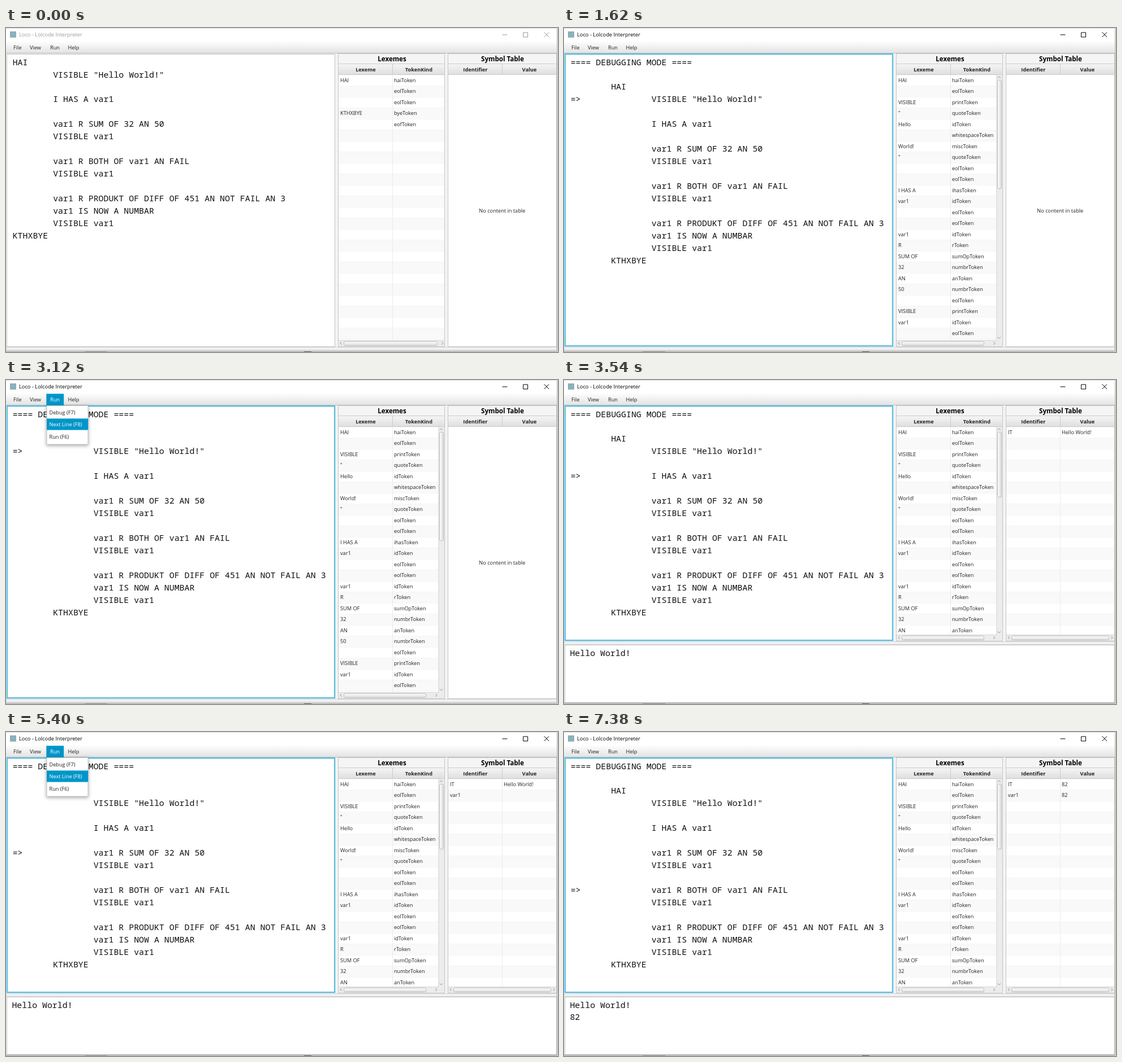
Animation, 976 px wide and 574 px high, one loop 8 s. Source, as an HTML page:

```html
<!DOCTYPE html>
<html lang="en">
<head>
<meta charset="utf-8">
<title>Loco - Lolcode Interpreter</title>
<style>
  html, body { margin: 0; width: 100%; height: 100%; overflow: hidden; background: #fff; }
  svg { display: block; width: 976px; height: 574px; }
  text { white-space: pre; font: 9.2px "Open Sans", "Noto Sans", sans-serif; fill: #222; }
  .code { font: 14.9px "Noto Sans Mono", "DejaVu Sans Mono", monospace; fill: #111; }
  .head { font-weight: 700; text-anchor: middle; }
  .panel { font-weight: 700; font-size: 11.6px; text-anchor: middle; fill: #000; }
  .title { font-size: 9.3px; }
  .mid { text-anchor: middle; }
  .inv { fill: #fff; }
  .shadow { filter: drop-shadow(0 2.5px 3px rgba(0, 0, 0, .35)); }
</style>
</head>
<body>
<svg id="stage" viewBox="0 0 976 574" xmlns="http://www.w3.org/2000/svg">
  <defs>
    <linearGradient id="bar" x2="0" y2="1"><stop stop-color="#fdfdfd"/><stop offset="1" stop-color="#e2e2e2"/></linearGradient>
    <linearGradient id="col" x2="0" y2="1"><stop stop-color="#f6f6f6"/><stop offset="1" stop-color="#dedede"/></linearGradient>
    <linearGradient id="thumbH" x2="0" y2="1"><stop stop-color="#fff"/><stop offset="1" stop-color="#dcdcdc"/></linearGradient>
    <linearGradient id="thumbV"><stop stop-color="#fff"/><stop offset="1" stop-color="#dcdcdc"/></linearGradient>
  </defs>
  <g id="view"></g>
</svg>
<script>
const LOOP = 8000, ROW = 19.5, LINE = 21.94, TAB = 71.5, BLUE = '#0096c9';

// Each step patches the state from that moment on.
const steps = [
  [0, {active: 0, run: 0, menu: 0, hot: -1, caret: 0, debug: 0, arrow: 3, split: 0, symbols: [], out: []}],
  [420, {run: 1}],
  [840, {active: 1, menu: 1, caret: 1}],
  [1080, {hot: 0}],
  [1320, {caret: 0}],
  [1620, {run: 0, menu: 0, hot: -1, debug: 1}],
  [2580, {run: 1}],
  [2880, {menu: 1}],
  [3060, {hot: 0}],
  [3120, {hot: 1}],
  [3540, {run: 0, menu: 0, hot: -1, arrow: 5, split: 1, symbols: [['IT', 'Hello World!']], out: ['Hello World!']}],
  [3720, {run: 1}],
  [4200, {menu: 1}],
  [4320, {hot: 1}],
  [4740, {menu: 0, hot: -1}],
  [4800, {run: 0, arrow: 7, symbols: [['IT', 'Hello World!'], ['var1', '']]}],
  [4920, {run: 1}],
  [5160, {menu: 1}],
  [5340, {hot: 0}],
  [5400, {hot: 1}],
  [6240, {run: 0, menu: 0, hot: -1, arrow: 8, symbols: [['IT', 'Hello World!'], ['var1', '82']]}],
  [7380, {arrow: 10, symbols: [['IT', '82'], ['var1', '82']], out: ['Hello World!', '82']}]
];

const program = `HAI
\tVISIBLE "Hello World!"

\tI HAS A var1

\tvar1 R SUM OF 32 AN 50
\tVISIBLE var1

\tvar1 R BOTH OF var1 AN FAIL
\tVISIBLE var1

\tvar1 R PRODUKT OF DIFF OF 451 AN NOT FAIL AN 3
\tvar1 IS NOW A NUMBAR
\tVISIBLE var1
KTHXBYE`.split('\n');
const listing = ['==== DEBUGGING MODE ====', '', ...program.map(l => '\t' + l)];

const pairs = s => s.split(',').map(p => p.split(':'));
const shortLexemes = pairs('HAI:hai,:eol,:eol,KTHXBYE:bye,:eof');
const lexemes = pairs('HAI:hai,:eol,VISIBLE:print,":quote,Hello:id,:whitespace,World!:misc,":quote,:eol,:eol,' +
  'I HAS A:ihas,var1:id,:eol,:eol,var1:id,R:r,SUM OF:sumOp,32:numbr,AN:an,50:numbr,:eol,VISIBLE:print,var1:id,:eol');

const esc = s => s.replace(/&/g, '&amp;').replace(/</g, '&lt;');
const rect = (x, y, w, h, fill, more = '') => `<rect x="${x}" y="${y}" width="${w}" height="${h}" fill="${fill}" ${more}/>`;
const box = (x, y, w, h, stroke, fill = 'none', more = '') =>
  rect(x + .5, y + .5, w - 1, h - 1, fill, `stroke="${stroke}" ${more}`);
const text = (x, y, s, cls = '', more = '') => s ? `<text x="${x}" y="${y}" class="${cls}" ${more}>${esc(s)}</text>` : '';
const path = (d, stroke, w = 1) => `<path d="${d}" fill="none" stroke="${stroke}" stroke-width="${w}"/>`;

function titleBar(s) {
  const ink = s.active ? '#000' : '#999';
  return rect(0, 0, 976, 24, '#fff') + rect(7, 6, 11, 11, '#8fb0ba') +
    text(23, 15.4, 'Loco - Lolcode Interpreter', 'title', `style="fill:${ink}"`) +
    path('M877.5 12h9M914.5 8h8v8h-8zM951.5 7.5l8.5 8.5M960 7.5l-8.5 8.5', ink);
}

function menuBar(s) {
  return rect(0, 24, 975, 21, 'url(#bar)') + rect(0, 44, 975, 1, '#bdbdbd') +
    (s.run ? rect(71.3, 24.4, 30.9, 20.8, BLUE) : '') +
    [[13, 'File'], [42, 'View'], [78, 'Run'], [109.5, 'Help']]
      .map(([x, label]) => text(x, 38, label, s.run && label === 'Run' ? 'inv' : '')).join('');
}

function popup(s) {
  const rows = [[48, 61.3, 'Debug (F7)'], [68.3, 81.6, 'Next Line (F8)'], [91, 104.3, 'Run (F6)']];
  return `<g class="shadow">${box(71.5, 45, 74, 69.5, '#c4c4c4', '#fff')}</g>` +
    rows.map(([y, base, label], i) => (s.hot === i ? rect(72, y, 73.2, 20.3, BLUE) : '') +
      text(76.5, base, label, s.hot === i ? 'inv' : '')).join('');
}

function editor(s, bottom) {
  const lines = s.debug ? listing : program;
  const ring = (color, w, alpha) => rect(1.9, 46.2, 579.2, bottom - 47, 'none',
    `stroke="${color}" stroke-width="${w}" stroke-opacity="${alpha}"`);
  const edge = s.active
    ? rect(1, 46, 581, bottom - 46, '#fff') + ring('#039ed3', 3.4, .15) + ring('#039ed3', 1.3, .9)
    : box(1, 46, 581, bottom - 45, '#c3c3c3', '#fff');
  const base = i => 65.6 + i * LINE;
  return edge +
    lines.map((l, i) => text(11.7 + TAB * (l.lastIndexOf('\t') + 1), base(i), l.trim(), 'code')).join('') +
    (s.debug ? text(11.7, base(s.arrow), '=>', 'code') : '') +
    (s.caret ? rect(190.4, 335, 1.3, 24, '#000') : '');
}

function scrollH(x, y, w, from, to) {
  const m = y + 5.5, r = x + w;
  return rect(x, y, w, 11, '#ececec') + rect(x, y, w, 1, '#d6d6d6') +
    box(from, y + 2, to - from, 8, '#bcbcbc', 'url(#thumbH)', 'rx="2"') +
    path(`M${x + 5.5} ${m - 2.5}l-2.5 2.5l2.5 2.5M${r - 5.5} ${m - 2.5}l2.5 2.5l-2.5 2.5`, '#8a8a8a');
}

function scrollV(x, y, h, to) {
  const m = x + 5, b = y + h;
  return rect(x, y, 11, h, '#ececec') + rect(x, y, 1, h, '#d6d6d6') +
    box(x + 1.5, y + 9, 8, to - y - 9, '#bcbcbc', 'url(#thumbV)', 'rx="2"') +
    path(`M${m - 2.5} ${y + 5.5}l2.5 -2.5l2.5 2.5M${m - 2.5} ${b - 5.5}l2.5 2.5l2.5 -2.5`, '#8a8a8a');
}

function table(x, split, right, bottom, title, heads, rows) {
  const end = right + 1, w = end - x;
  let out = rect(x, 46, w, 17, '#f5f5f5') + text((x + end) / 2 + .5, 59.2, title, 'panel') +
    rect(x, 63, w, 20, 'url(#col)') + path(`M${x} 63.5H${end}M${x} 82.5H${end}M${split + .5} 64V82`, '#cbcbcb') +
    text((x + split) / 2 + .4, 76.8, heads[0], 'head') + text((split + end) / 2 + .4, 76.8, heads[1], 'head') +
    rect(x, 83, w, bottom - 83, '#fff');
  if (!rows) return out + text(877.3, 327, 'No content in table', 'mid');
  for (let i = 0, y = 83; y < bottom; i++, y += ROW) {
    const h = Math.min(ROW, bottom - y);
    if (i % 2) out += rect(x, y, w, h, '#f9f9f9');
    out += rect(x, y, w, .6, '#efefef');
    if (rows[i] && y + 13 < bottom) {
      out += text(x + 3, y + 12.6, rows[i][0]) + text(split + 2.9, y + 12.6, rows[i][1]);
    }
  }
  return out + rect(split, 83, 1, bottom - 83, '#ebebeb');
}

function render(s) {
  const bottom = s.split ? 462 : 564, foot = bottom - 11;
  const tokens = (s.debug ? lexemes : shortLexemes).map(([a, b]) => [a, b + 'Token']);
  let out = rect(0, 0, 976, 574, '#f3f3f3') + titleBar(s) + menuBar(s) + editor(s, bottom);

  out += table(588, 683, 775, foot, 'Lexemes', ['Lexeme', 'TokenKind'], tokens);
  if (s.debug) {
    out += scrollV(764.5, 83, foot - 83, s.split ? 208 : 285) +
      rect(765, foot, 11, 11, '#ececec') + scrollH(588, foot, 177, 597, 743);
  } else {
    out += scrollH(588, foot, 188, 597, 763);
  }
  out += box(587, 45, 189, bottom - 44, '#c6c6c6');

  out += table(782, 877, 972, s.split ? foot : bottom, 'Symbol Table', ['Identifier', 'Value'], s.split ? s.symbols : null);
  if (s.split) out += scrollH(782, foot, 191, 791, 964);
  out += box(781, 45, 193, bottom - 44, '#c6c6c6');

  if (s.split) {
    out += box(0, 463, 974, 6, '#d6d6d6', '#f1f1f1') + box(1, 469, 973, 103, '#c3c3c3', '#fff') +
      s.out.map((l, i) => text(10.4, 488.5 + i * LINE, l, 'code')).join('');
  } else {
    out += box(0, 565, 974, 6, '#d2d2d2', '#f1f1f1');
  }
  out += rect(0, 572, 976, 1, '#9a9a9a') + rect(0, 573, 976, 1, '#dcdcdc') +
    rect(139, 573, 40, 1, '#aaa') + rect(527, 573, 13, 1, '#777') +
    rect(974, 0, 1, 573, '#a8a8a8') + rect(975, 0, 1, 574, '#e4e4e4') + rect(0, 0, 975, 1, '#d8d8d8');
  return out + (s.menu ? popup(s) : '');
}

const view = document.getElementById('view');
const start = performance.now();
let shown = -1;

function tick() {
  const t = (performance.now() - start) % LOOP;
  const past = steps.filter(([at]) => at <= t);
  if (past.length !== shown) {
    shown = past.length;
    view.innerHTML = render(Object.assign({}, ...past.map(([, patch]) => patch)));
  }
  requestAnimationFrame(tick);
}
tick();
</script>
</body>
</html>
```
